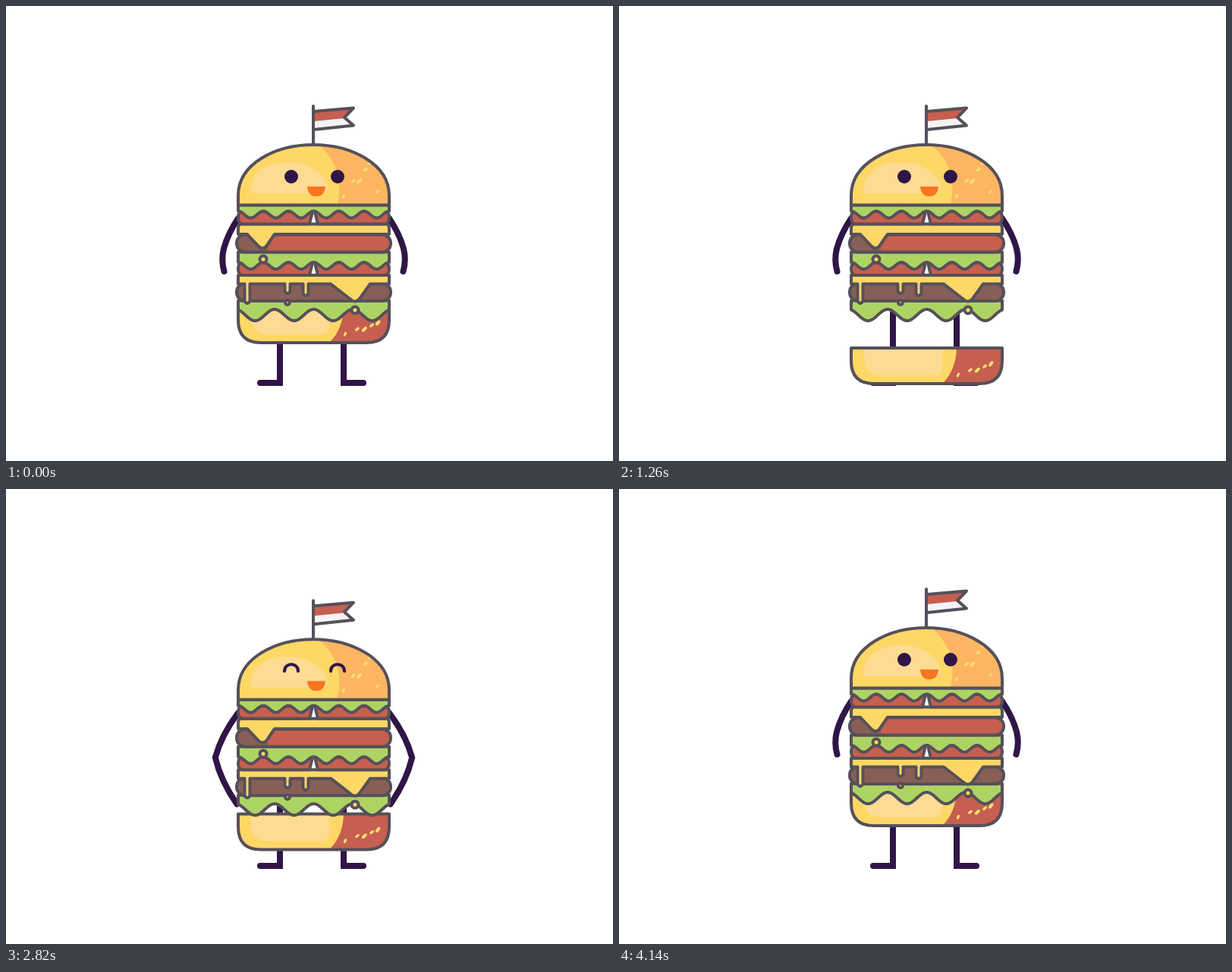
An HTML page for the animation above (4.17 s loop, 800 by 600 pixels).

```html
<!DOCTYPE html>
<html lang="en">
<head>
<meta charset="utf-8">
<title>Burger</title>
<style>
html, body { margin: 0; width: 100%; height: 100%; overflow: hidden; background: #fff; }
svg { display: block; width: 800px; height: 600px; }
.o { stroke: #56505a; stroke-width: 4; stroke-linejoin: round; stroke-linecap: round; }
.limb { fill: none; stroke: #2f1647; stroke-width: 8; stroke-linecap: round; }
.yellow { fill: #fdd866; }
.pale { fill: #fddb92; }
.amber { fill: #fcb662; }
.red { fill: #c65f4f; }
.brown { fill: #885f57; }
.green { fill: #add463; }
.seed { fill: #fddc72; }
.none { fill: none; }
</style>
</head>
<body>
<svg viewBox="0 0 800 600">
  <defs>
    <path id="dome" d="M306 262.500V250C306 208 355 183 405 183S505 208 505 250V262.500Z"/>
    <path id="base" d="M306 397H505V414Q505 444 475 444H336Q306 444 306 414Z"/>
    <rect id="patty" x="304" y="301.500" width="203" height="23" rx="11"/>
    <path id="slice" d="M312 271H404L400 287.500H312Q306 287 306 279T312 271Z"/>
    <g id="tomato" class="o red">
      <use href="#slice"/>
      <use href="#slice" transform="translate(811 0) scale(-1 1)"/>
    </g>
    <clipPath id="inDome"><use href="#dome"/></clipPath>
    <clipPath id="inBase"><use href="#base"/></clipPath>
    <clipPath id="inPatty"><use href="#patty"/></clipPath>
  </defs>

  <path class="limb" d="M361 405V497H335M445 405V497H471"/>

  <g id="bun">
    <use href="#base" class="yellow"/>
    <g clip-path="url(#inBase)">
      <path class="pale" d="M323 397H426V422Q426 433 414 433H346Q323 431 323 412Z"/>
      <path class="red" d="M445 397Q444 428 424 446H510V397Z"/>
      <g id="baseSeeds" class="seed"></g>
    </g>
    <use href="#base" class="o none"/>
  </g>

  <g id="body">
    <path id="armL" class="limb"/>
    <path id="armR" class="limb"/>

    <path id="leaf3" class="o green"/>
    <use href="#patty" class="o brown" y="64.500"/>
    <path class="o yellow" id="melt"/>
    <circle class="o yellow" cx="371" cy="391" r="3"/>
    <circle class="o yellow" cx="460" cy="401" r="4.500"/>

    <use href="#tomato" y="67.500"/>
    <path id="leaf2" class="o green"/>
    <use href="#patty" class="red"/>
    <path class="brown" d="M300 300H345V326H300Z" clip-path="url(#inPatty)"/>
    <use href="#patty" class="o none"/>
    <path class="o yellow" d="M310 287.500H501Q505 288 505 293V301H354L343 317Q338 322 333 317L318 301H306V293Q306 288 310 287.500Z"/>
    <circle class="o yellow" cx="339" cy="334" r="4.500"/>

    <use href="#tomato"/>
    <path id="leaf1" class="o green"/>

    <path d="M406 152L446 148L459 158L406 163Z" fill="#f4f3f5"/>
    <path class="red" d="M406 139L459 134L446 148L406 152Z"/>
    <path class="o none" d="M405 132V183M406 139L458 134.500L446 147L458 157.500L406 163"/>

    <use href="#dome" class="yellow"/>
    <g clip-path="url(#inDome)">
      <path class="pale" d="M323 247V240C323 218 345 206 372 206C402 206 424 225 424 240Q424 247 416 247Z"/>
      <path class="amber" d="M408 180Q450 213 436 264H510V180Z"/>
      <g id="domeSeeds" class="seed"></g>
    </g>
    <use href="#dome" class="o none"/>

    <g id="awake" fill="#2f1647">
      <circle cx="376" cy="225" r="9"/>
      <circle cx="437" cy="225" r="9"/>
    </g>
    <path id="happy" class="none" stroke="#2f1647" stroke-width="4" stroke-linecap="round"
      d="M367 225C367 213 385 213 385 225M428 225C428 213 446 213 446 225"/>
    <path d="M397 238H421Q420 251 409 251T397 238Z" fill="#fb7520"/>
  </g>
</svg>
<script>
const LOOP = 4170, LEFT = 306, RIGHT = 505, CENTER = 405.5;
const get = id => document.getElementById(id);
const setPath = (id, d) => get(id).setAttribute("d", d);

// Lettuce with a cosine lower edge, cresting at the centre
function leaf(id, top, mid, amp, period) {
  let d = `M${LEFT} ${top}H${RIGHT}`;
  for (let x = RIGHT; x >= LEFT; x--) {
    d += `L${x} ${mid - amp * Math.cos((x - CENTER) / period * 2 * Math.PI)}`;
  }
  setPath(id, d + "Z");
}
leaf("leaf1", 262.5, 275, 4.5, 33.2);
leaf("leaf2", 324.5, 342.5, 4.5, 33.2);
leaf("leaf3", 388.5, 407.5, 7.5, 51.5);

// Melted cheese: a big corner on the right, narrow drips to its left
const drip = (x, end) => `H${x + 3.5}V${end - 3}Q${x} ${end + 3} ${x - 3.5} ${end - 3}V366.5`;
setPath("melt", `M${LEFT} 355H${RIGHT}V366.5H480L466 386Q460 393 453 386L428 366.5`
  + drip(395, 382) + drip(371, 379) + drip(318, 392) + `H${LEFT}Z`);

// Seeds scattered with a fixed random sequence, one per column
function seeds(id, x, y, width, height, count) {
  let s = 7, svg = "";
  const random = () => (s = s * 16807 % 2147483647) / 2147483647;
  for (let i = 0; i < count; i++) {
    const cx = x + width * (i + random()) / count;
    const cy = y + height * random();
    const r = 2.5 + 2.5 * random();
    svg += `<ellipse cx="${cx}" cy="${cy}" rx="${r}" ry="${r / 2}" transform="rotate(${-75 + 50 * random()} ${cx} ${cy})"/>`;
  }
  get(id).innerHTML = svg;
}
seeds("domeSeeds", 445, 203, 45, 52, 6);
seeds("baseSeeds", 447, 417, 46, 17, 5);

// Arm pose: elbow distance from centre, elbow y, hand distance, hand y, bulge
const rest = [118.5, 320, 118, 350, 4];
const grab = [128, 354, 101, 427, 3];
const hips = [132, 318, 101.5, 363, 13];

function arm(id, side, [elbow, elbowY, hand, handY, bulge]) {
  const shoulder = 99.5, shoulderY = 280;
  const at = (out, y) => `${CENTER + side * out} ${y} `;
  const curve = (x0, y0, x1, y1) => "Q" + at((x0 + x1) / 2 + bulge, (y0 + y1) / 2) + at(x1, y1);
  setPath(id, "M" + at(shoulder, shoulderY)
    + curve(shoulder, shoulderY, elbow, elbowY) + curve(elbow, elbowY, hand, handY));
}

function ease(t, from, to) {
  const p = Math.min(1, Math.max(0, (t - from) / (to - from)));
  return p * p * (3 - 2 * p);
}
const mix = (a, b, p) => a.map((v, i) => v + (b[i] - v) * p);

function draw(t) {
  const lift = ease(t, 2708, 2960);
  const drop = 54 * ease(t, 0, 810) * (1 - lift);
  const sink = 26 * ease(t, 1667, 2083) * (1 - lift);
  get("bun").setAttribute("transform", `translate(0 ${drop})`);
  get("body").setAttribute("transform", `translate(0 ${sink})`);

  const reach = mix(rest, grab, ease(t, 2180, 2690));
  const pose = mix(mix(reach, hips, lift), rest, ease(t, 3333, 3750));
  arm("armL", -1, pose);
  arm("armR", 1, pose);

  const smiling = t >= 1667 && t < 3540;
  get("awake").style.display = smiling ? "none" : "";
  get("happy").style.display = smiling ? "" : "none";
}

let start;
function tick(now) {
  start ??= now;
  draw((now - start) % LOOP);
  requestAnimationFrame(tick);
}
draw(0);
requestAnimationFrame(tick);
</script>
</body>
</html>
```
